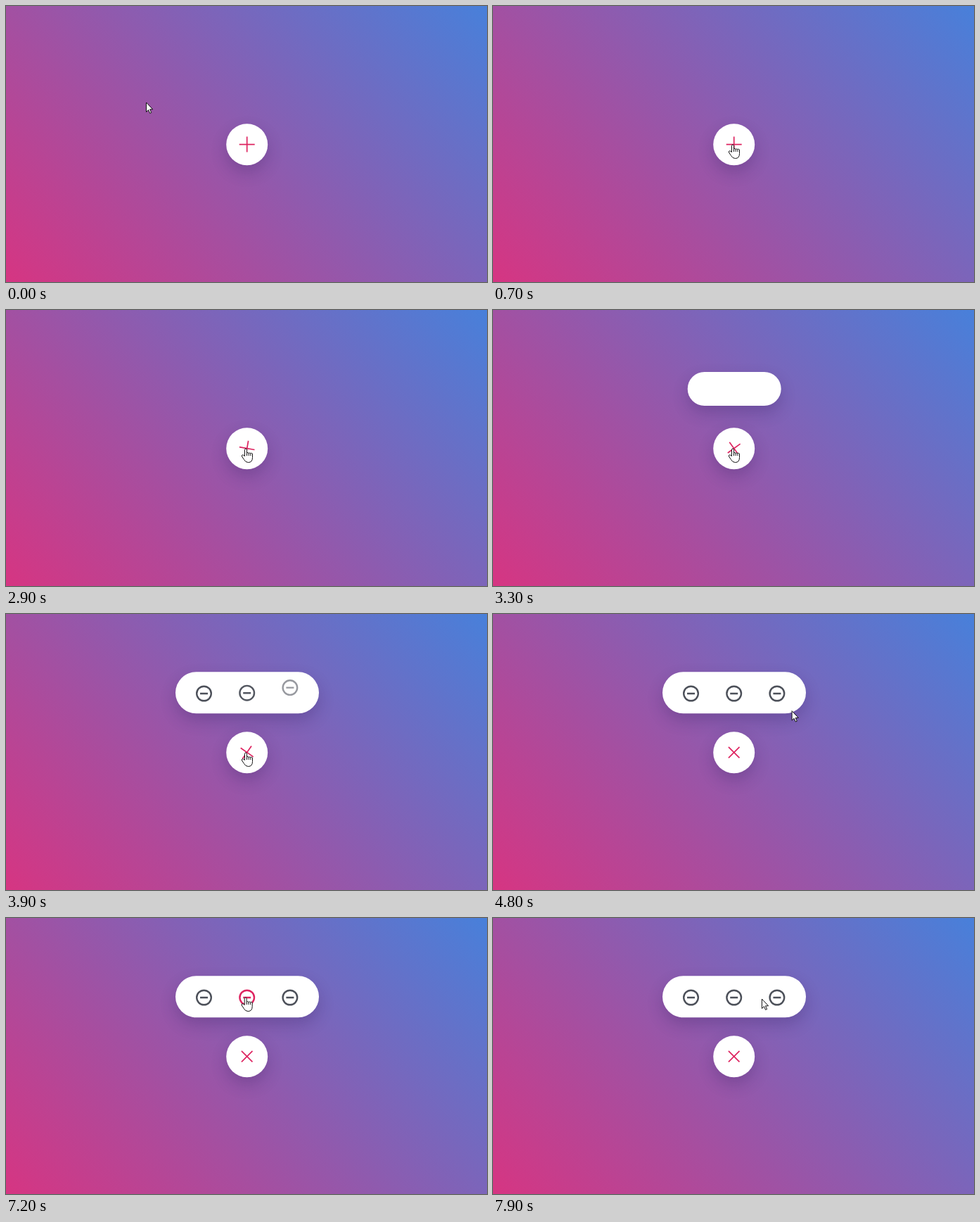
Animation, 684 px wide and 392 px high, one loop 8000 ms. Source, as an HTML page:

```html
<!DOCTYPE html>
<html lang="en">
<head>
<meta charset="utf-8">
<title>Floating action menu</title>
<style>
  html, body { margin: 0; width: 100%; height: 100%; overflow: hidden; }
  body { position: relative; background: linear-gradient(45deg, #d63582, #4880da); }
  #fab, #pill {
    position: absolute;
    transform: translate(-50%, -50%);
    border-radius: 100px;
    background: #fff;
    box-shadow: 0 10px 22px rgba(40, 20, 85, .24);
  }
  #fab { left: 342.9px; top: 196.8px; width: 59.6px; height: 59.6px; }
  #pill { left: 342.9px; top: 111.8px; }
  svg { position: absolute; left: 0; top: 0; }
</style>
</head>
<body>
<div id="pill"></div>
<div id="fab"></div>
<svg width="684" height="392" fill="none">
  <path id="plus" d="M-11 0H11M0-11V11" stroke="#de2460" stroke-width="1.7"/>
  <g id="icons" stroke-width="2.4"></g>
  <g fill="#fff" stroke="#111" stroke-linejoin="round">
    <path id="arrow" d="M.5 1V14.5L3.5 11.6 5.7 16.4 7.7 15.5 5.6 10.8H9.7Z"/>
    <path id="hand" d="M-1.5 10.5V1.5a1.5 1.5 0 0 1 3 0V6.5a1.4 1.4 0 0 1 2.7 .3a1.4 1.4 0 0 1 2.7 .5
      a1.3 1.3 0 0 1 2.6 .7V12.5q0 7-6 7-4 0-6-4l-3-4.5q-.8-2 1-2.2 1.2 0 3 1.7ZM1.5 6.5V10M4.2 7V10M6.9 7.5V10"/>
  </g>
</svg>
<script>
const LOOP = 8000, ROW = 113;
const $ = id => document.getElementById(id);
const progress = (t, start, length) => Math.max(0, Math.min(1, (t - start) / length));
const smooth = p => p * p * (3 - 2 * p);
const ease = (t, start, length) => smooth(progress(t, start, length));
const near = ([x, y], cx, cy, r) => Math.hypot(x - cx, y - cy) < r;
const iconX = i => 342.7 + 61.2 * (i - 1);

const icons = [0, 1, 2].map(() => {
  const el = document.createElementNS('http://www.w3.org/2000/svg', 'path');
  el.setAttribute('d', 'M-10.3 0a10.3 10.3 0 1 0 20.6 0a10.3 10.3 0 1 0-20.6 0M-5.5 0H5.5');
  return $('icons').appendChild(el);
});

const home = [199, 136], button = [341, 197], outside = [431, 132];
const icon = i => [iconX(i) - 2, ROW];
const leftOf = i => [iconX(i) - 22 - 10 * (i === 1), 117 - 3 * (i === 2)];

const moves = [
  { at: 50, time: 650, to: button },
  { at: 4550, time: 300, to: outside },
  { at: 4850, time: 450, to: icon(0) },
  { at: 5480, time: 210, to: leftOf(1) },
  { at: 5790, time: 210, to: icon(0) },
  { at: 6350, time: 750, to: icon(1) },
  { at: 7230, time: 270, to: icon(2) },
  { at: 7730, time: 150, to: leftOf(2) }
];

const pointer = t => moves.reduce((from, { at, time, to }) => {
  const p = ease(t, at, time);
  return from.map((v, k) => v + (to[k] - v) * p);
}, home);

function draw(t) {
  const grow = ease(t, 2880, 700);
  $('pill').style.width = 204 * grow + 'px';
  $('pill').style.height = 59.5 * Math.sqrt(grow) + 'px';
  $('pill').style.opacity = Math.min(1, grow * 20);

  const angle = 135 * ease(t, 2650, 1500);
  $('plus').setAttribute('transform', `translate(342.7 196.6) rotate(${angle})`);

  // Icon colour trails the pointer slightly
  const pos = pointer(t), recent = pointer(t - 90);
  let hand = near(pos, ...button, 30);
  icons.forEach((el, i) => {
    const drop = 1 - (1 - progress(t, 3400 + 180 * i, 400)) ** 2;
    const lit = near(recent, iconX(i), ROW, 13);
    hand ||= near(pos, iconX(i), ROW, 13);
    el.setAttribute('transform', `translate(${iconX(i)} ${ROW - 20 * (1 - drop)})`);
    el.setAttribute('opacity', drop);
    el.setAttribute('stroke', lit ? '#de2460' : '#4c5059');
  });

  for (const [id, shown] of [['hand', hand], ['arrow', !hand]]) {
    $(id).setAttribute('transform', `translate(${pos})`);
    $(id).style.display = shown ? '' : 'none';
  }
}

const start = performance.now();
function frame() {
  draw((performance.now() - start) % LOOP);
  requestAnimationFrame(frame);
}
frame();
</script>
</body>
</html>
```
